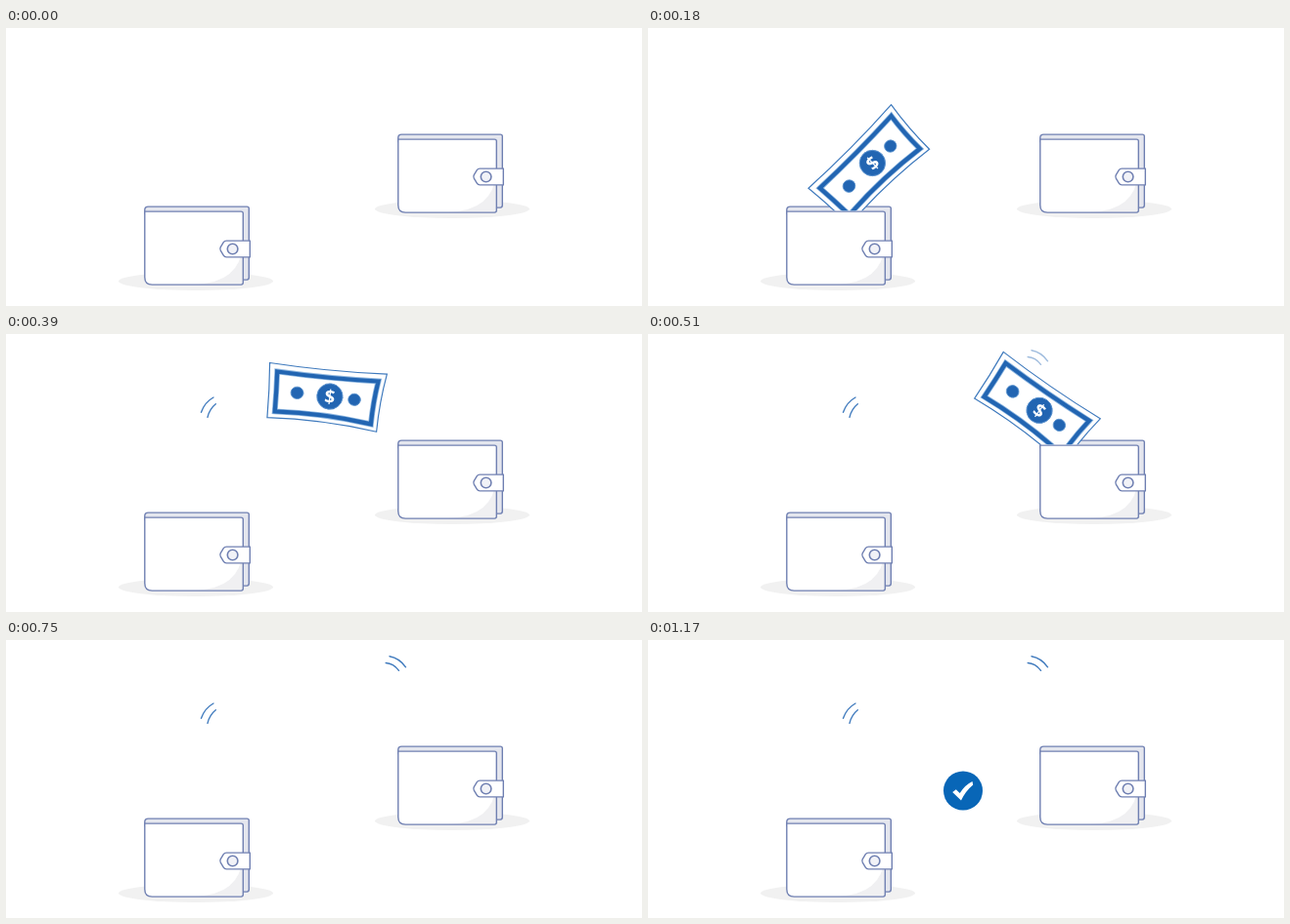
Write an HTML page with a canvas that moves like this. It is 650 by 285 pixels and loops after 1.53 s.

```html
<!DOCTYPE html>
<html lang="en">
<head>
<meta charset="utf-8">
<title>Wallet transfer</title>
<style>
html, body { margin: 0; width: 100%; height: 100%; overflow: hidden; background: #fff; }
canvas { display: block; width: 650px; height: 285px; }
</style>
</head>
<body>
<canvas id="stage"></canvas>
<script>
const LOOP = 1530, STEP = 30, W = 650, H = 285;
const BLUE = '#2265b2', EDGE = '#3f7abd', LINE = '#7080b2';
const canvas = document.getElementById('stage');
const ctx = canvas.getContext('2d');
const ratio = window.devicePixelRatio || 1;
canvas.width = W * ratio;
canvas.height = H * ratio;

const clamp = v => Math.max(0, Math.min(1, v));
const rad = deg => deg * Math.PI / 180;

function shape(d, fill, stroke, width = 1.4) {
  const path = new Path2D(d);
  if (fill) {
    ctx.fillStyle = fill;
    ctx.fill(path);
  }
  if (stroke) {
    ctx.strokeStyle = stroke;
    ctx.lineWidth = width;
    ctx.stroke(path);
  }
}

function disc(x, y, rx, ry, fill, stroke, width = 1.4) {
  ctx.beginPath();
  ctx.ellipse(x, y, rx, ry, 0, 0, Math.PI * 2);
  ctx.fillStyle = fill;
  ctx.fill();
  if (stroke) {
    ctx.strokeStyle = stroke;
    ctx.lineWidth = width;
    ctx.stroke();
  }
}

function wallet(x, y, shadowX) {
  ctx.save();
  ctx.translate(x, y);
  disc(shadowX, 77, 79, 9.3, '#f1f1f1');
  shape('M.5 8 V4 Q.5 .5 4 .5 H105 Q107 .5 107 2.5 V73 Q107 75.5 105 75.5 H95 V8 Z', '#e4e6ee', LINE);
  shape('M.5 5.5 H99 Q101 5.5 101 7.5 V78.5 Q101 80.5 99 80.5 H8 Q.5 80.5 .5 73 Z', '#fff');
  shape('M100.5 40 V80 H52 Q98 79 100.5 40 Z', '#f0f0f2');
  shape('M.5 5.5 H99 Q101 5.5 101 7.5 V78.5 Q101 80.5 99 80.5 H8 Q.5 80.5 .5 73 Z', null, LINE);
  shape('M108 35.5 H84 Q82 35.5 81 37 L78 42 Q77 43.8 78 45.5 L81 50.5 Q82 52.3 84 52.3 H108 Z', '#fff', LINE);
  disc(90.3, 43.9, 5.3, 5.3, '#f1f2f7', LINE, 1.6);
  ctx.restore();
}

// The note swings over a pivot between the wallets while turning evenly.
function note(t) {
  if (t < 30 || t >= 750) return;
  const u = t - 390;
  const swing = rad(-5.9 + 0.2575 * u - 0.000045 * u * u);
  const reach = 130 + 6.7 * Math.exp(-((u / 150) ** 2));
  ctx.save();
  ctx.beginPath();
  ctx.rect(0, 0, W, u < 0 ? 187.3 : 113.3);
  ctx.clip();
  ctx.translate(345 + reach * Math.sin(swing), 200 - reach * Math.cos(swing));
  ctx.rotate(rad(6.8 + 0.2425 * u));
  shape('M-65 -27 Q-5 -25 55.3 -29.6 Q51 0 51.6 30.3 Q-5 24 -61 29 Q-62 0 -65 -27 Z', '#fff', EDGE, 1.2);
  const band = 'M-56.4 -19 Q-5 -18 47.4 -21.3 Q44.6 0 45 23.2 Q-5 17.5 -54 21.8 Q-54.8 0 -56.4 -19 Z';
  shape(band, null, '#8db6e0', 5.8);
  shape(band, null, BLUE, 4.2);
  disc(-33.6, 0.3, 6.5, 6.2, BLUE, '#5b93cf', 0.8);
  disc(25.3, 0.3, 6.3, 6.1, BLUE, '#5b93cf', 0.8);
  disc(0, 0, 13.2, 13.2, BLUE, '#5b93cf', 0.9);
  ctx.fillStyle = '#fff';
  ctx.font = '700 19px "Open Sans", sans-serif';
  ctx.textAlign = 'center';
  ctx.textBaseline = 'alphabetic';
  ctx.fillText('$', 0, 6.8);
  ctx.restore();
}

function whoosh(d, alpha) {
  ctx.globalAlpha = clamp(alpha);
  shape(d, null, EDGE, 1.4);
  ctx.globalAlpha = 1;
}

function badge(t) {
  if (t < 930) return;
  const size = t < 1050
    ? 1.25 * (t - 900) / 150
    : 1 + 0.25 * (1 - clamp((t - 1050) / 120));
  ctx.save();
  ctx.translate(322, 154.5);
  ctx.scale(size, size);
  disc(0, 0, 20, 20, '#0866b7');
  shape('M-10.8 1.5 L-7.2 -1.2 L-3.3 2.6 Q1.5 -5.8 9.5 -9.6 L10.2 -6 Q2.4 .5 -2 10 Z', '#fff');
  ctx.restore();
}

function draw(t) {
  ctx.setTransform(ratio, 0, 0, ratio, 0, 0);
  ctx.fillStyle = '#fff';
  ctx.fillRect(0, 0, W, H);
  ctx.lineCap = 'round';
  wallet(141.3, 182.6, 52.7);
  wallet(400.3, 108.6, 55.7);
  whoosh('M199.5 80.3 Q203 70 212 65 M206 85.3 Q208 77 214.3 71.8', (t - 210) / 150);
  whoosh('M392 16.7 Q402 18.5 408.5 27.8 M388.2 23.5 Q396 24 401.5 31.3', (t - 435) / 150);
  note(t);
  badge(t);
}

const start = performance.now();
function tick() {
  const t = (performance.now() - start) % LOOP;
  draw(Math.floor(t / STEP) * STEP);
  requestAnimationFrame(tick);
}
tick();
</script>
</body>
</html>
```
